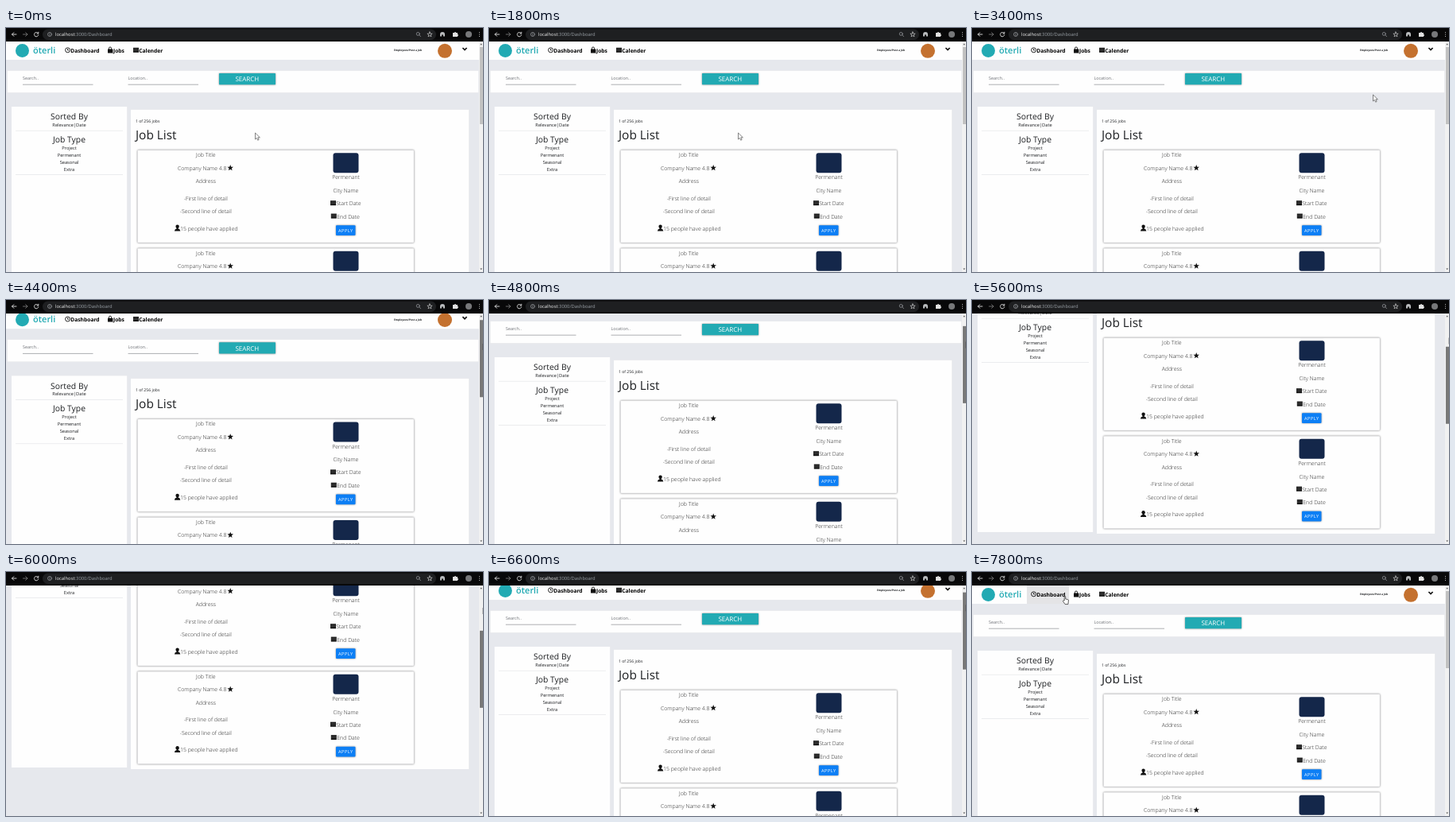
Recreate the animation shown at these times as an HTML page. Size 600x307 px, loop 8 s.

```html
<!DOCTYPE html>
<html lang="en">
<head>
<meta charset="utf-8">
<title>Job dashboard</title>
<style>
  html, body { margin: 0; width: 100%; height: 100%; overflow: hidden; background: #e6e8ed; }
  svg { display: block; width: 100%; height: 100%; }
  text { font-family: "Open Sans", "Noto Sans", sans-serif; fill: #1d1f22; text-rendering: geometricPrecision; white-space: pre; }
  .mid { text-anchor: middle; }
  .nav { font-size: 6.7px; font-weight: 700; fill: #000; }
  .hint { font-size: 5.4px; fill: #6d7075; }
  .head { font-size: 10.4px; font-weight: 500; }
  .item { font-size: 5.7px; font-weight: 500; }
  .line { font-size: 6.95px; font-weight: 300; fill: #222; }
  .white { fill: #fefefe; }
  .teal { fill: #22aab3; }
  .rule { stroke: #dfe1e4; stroke-width: .6; }
  .field { stroke: #8b8e92; stroke-width: .7; }
  .icon { fill: none; stroke: #e4e4e4; stroke-width: .9; stroke-linecap: round; stroke-linejoin: round; }
  .panel { filter: drop-shadow(0 .3px .5px #0002); }
  .raised { filter: drop-shadow(0 .7px .8px #0007); }
</style>
</head>
<body>
<svg viewBox="0 0 600 307" preserveAspectRatio="none">
  <defs>
    <g id="calendar">
      <path d="M0 .6H7V6.6H0Z" fill="#111"/>
      <path d="M.3 2.3H6.7M.3 4.2H6.7" stroke="#aaa" stroke-width=".35"/>
    </g>
    <g id="card"></g>
  </defs>

  <rect width="600" height="307" fill="#e6e8ed"/>

  <g id="page">
    <rect class="white" y="10" width="595" height="30"/>
    <rect id="hover" x="69" y="17" width="53" height="23" fill="#e4e4e6"/>
    <circle class="teal" cx="20.5" cy="28.5" r="8.5"/>
    <text x="34" y="32.2" class="teal" font-size="11" font-weight="600">öterli</text>
    <g fill="none" stroke="#111" stroke-width=".9">
      <circle cx="77.6" cy="27.8" r="3"/>
      <path d="M77.6 26V28H79"/>
      <path d="M129.4 27V25.6A1.6 1.6 0 0 1 132.6 25.6V27"/>
    </g>
    <rect x="128" y="26.6" width="6.4" height="4.8" rx=".5" fill="#111"/>
    <use href="#calendar" x="160" y="24.2"/>
    <text x="81.3" y="30.6" class="nav">Dashboard</text>
    <text x="135" y="30.6" class="nav">Jobs</text>
    <text x="167.3" y="30.6" class="nav">Calender</text>
    <text x="488" y="29.4" font-size="3.3" font-weight="700">Employees/Post a Job</text>
    <ellipse cx="552" cy="28.8" rx="9" ry="9" fill="#c4712f"/>
    <path d="M574.4 25L577 27.6L579.6 25" fill="none" stroke="#111" stroke-width="1.7"/>

    <rect class="white panel" x="1.5" y="53.5" width="593" height="28"/>
    <text x="21" y="64.8" class="hint">Search..</text>
    <text x="153.5" y="64.8" class="hint">Location..</text>
    <path class="field" d="M21 71.2H109.5M153.5 71.2H242"/>
    <rect class="teal raised" x="268" y="57" width="71" height="14.3" rx=".5"/>
    <text x="303.3" y="67.4" class="mid white" font-size="8">SEARCH</text>

    <rect class="white panel" x="7" y="99" width="145.5" height="299"/>
    <path class="rule" d="M12 129.3H147M12 184.5H147"/>
    <g id="filters"></g>

    <rect class="white panel" x="157" y="102.5" width="425.5" height="297.5"/>
    <text x="163" y="118.6" font-size="5.1">1 of 256 jobs</text>
    <text x="163" y="139.6" font-size="15.4" font-weight="500">Job List</text>
    <use href="#card"/>
    <use href="#card" y="123.5"/>
  </g>

  <rect x="595" y="17" width="5" height="290" fill="#f1f1f1"/>
  <path d="M596.3 21.3L597.7 19.6L599.1 21.3ZM596.3 302.5L597.7 304.2L599.1 302.5Z" fill="#555"/>
  <rect id="thumb" x="596" y="24" width="4" height="97"/>

  <rect width="600" height="17" fill="#080809"/>
  <rect x="46" y="1.5" width="495" height="13.5" rx="6.7" fill="#1e1f21"/>
  <g class="icon">
    <path d="M13 8H7.5M9.8 5.7L7.5 8L9.8 10.3"/>
    <path d="M21.5 8H27M24.7 5.7L27 8L24.7 10.3" stroke="#777"/>
    <path d="M40.4 6.6A2.7 2.7 0 1 0 40.8 8.8M40.8 5.2V7H39"/>
    <g stroke="#a0a3a7" stroke-width=".7">
      <circle cx="55" cy="8" r="2.5"/>
      <path d="M55 7.8V9.3M55 6.6V6.7"/>
      <circle cx="518.3" cy="7.4" r="2"/>
      <path d="M519.8 8.9L521.6 10.7"/>
    </g>
    <path id="bookmark" stroke-width=".6"/>
  </g>
  <text x="62" y="10.1" font-size="5.85" style="fill:#f1f1f1">localhost<tspan fill="#9aa0a6">:3000/Dashboard</tspan></text>
  <path d="M546 10.5V8A3 3 0 0 1 552 8V10.5H550V8.5H548V10.5Z" fill="#b9bbbd"/>
  <path d="M562 6H564A1 1 0 0 1 566 6H568V8A1 1 0 0 1 568 10V11H562Z" fill="#e2e2e2"/>
  <circle cx="582" cy="8" r="4" fill="#77787a"/>
  <path d="M595.5 5.6V5.7M595.5 8V8.1M595.5 10.4V10.5" class="icon" stroke-width="1.2"/>

  <path id="arrow" d="M0 0V8L1.9 6.4L3.2 9.2L4.6 8.5L3.4 5.8H5.9Z" fill="#fff" stroke="#333" stroke-width=".6"/>
  <path id="hand" d="M1.7 6V1A.8 .8 0 0 1 3.2 1V4L6 4.6Q7 4.8 6.9 6L6.3 10.6H2.6L.2 7.2Q-.4 6 .6 5.6Z" fill="#fff" stroke="#222" stroke-width=".7"/>
</svg>

<script>
const $ = id => document.getElementById(id);
const label = (cls, x, y, words) => `<text class="${cls}" x="${x}" y="${y}">${words}</text>`;
const centred = (cls, x, rows) => rows.map(([y, words]) => label(cls + " mid", x, y, words)).join("");

function star(cx, cy, radius) {
  const points = Array.from({ length: 10 }, (_, i) => {
    const r = i % 2 ? radius * 0.42 : radius, a = i * Math.PI / 5;
    return (cx + r * Math.sin(a)).toFixed(2) + " " + (cy - r * Math.cos(a)).toFixed(2);
  });
  return "M" + points.join("L") + "Z";
}

$("bookmark").setAttribute("d", star(533, 8.2, 3.3));

$("filters").innerHTML =
  centred("head", 79.5, [[115.4, "Sorted By"], [144.2, "Job Type"]]) +
  centred("item", 79.5, [[124.3, "Relevance|Date"], [153.1, "Project"], [162, "Permenant"],
    [170.7, "Seasonal"], [179.5, "Extra"]]);

$("card").innerHTML = `
  <rect class="white raised" x="165.5" y="153.7" width="347.5" height="116.3" rx="1" stroke="#d4d5d8" stroke-width=".4"/>
  <path d="${star(282.2, 176, 4)}" fill="#111"/>
  <circle cx="215.6" cy="249.8" r="2.2" fill="#111"/>
  <path d="M211.9 255.6Q212 253 214.6 252.4V251H216.6V252.4Q219.2 253 219.3 255.6Z" fill="#111"/>
  <rect x="411.5" y="157.3" width="32" height="25" rx="3" fill="#14274a"/>
  <use href="#calendar" x="408" y="216.6"/>
  <use href="#calendar" x="408.8" y="233"/>
  <rect class="raised" x="415" y="248.2" width="24.5" height="12.8" rx="1" fill="#0d7ff5"/>
  <text x="418" y="256.7" class="white" font-size="5.6" letter-spacing=".5">APPLY</text>` +
  centred("line", 251.3, [[162.2, "Job Title"], [195, "Address"],
    [216.6, "-First line of detail"], [233, "-Second line of detail"]]) +
  label("line", 216, 178.6, "Company Name 4.8") +
  label("line", 219, 254.6, "15 people have applied") +
  centred("line", 427.5, [[190.4, "Permenant"], [207, "City Name"]]) +
  label("line", 415.2, 223.2, "Start Date") +
  label("line", 416.3, 239.6, "End Date");

const LOOP = 8000, STEP = 200;
const SCROLL_START = 4400;
const scrolls = [3.8, 13, 27, 42, 59, 81, 106, 131, 152, 113, 48, 5];
// time, x, y of the pointer tip
const pointer = [[0, 313.5, 132], [3000, 313.5, 132], [3600, 600, 60], [6800, 600, 40],
  [7600, 122, 34], [7800, 114.5, 30]];

function pointerAt(t) {
  const i = pointer.findIndex(key => key[0] > t);
  if (i < 0) return pointer.at(-1).slice(1);
  const [t0, x0, y0] = pointer[i - 1], [t1, x1, y1] = pointer[i];
  const k = (t - t0) / (t1 - t0);
  return [x0 + (x1 - x0) * k, y0 + (y1 - y0) * k];
}

const show = (id, on) => $(id).setAttribute("visibility", on ? "visible" : "hidden");
const move = (id, x, y) => $(id).setAttribute("transform", `translate(${x} ${y})`);

function thumbColour(t) {
  if (t >= 4000 && t < 7000) return "#787878";
  return t >= 3600 && t < 4000 ? "#a8a8a8" : "#c1c1c1";
}

function draw(time) {
  const t = Math.floor(time % LOOP / STEP) * STEP;
  const scroll = scrolls[(t - SCROLL_START) / STEP] ?? 0;
  const [x, y] = pointerAt(t);
  const onLink = t >= 7600;
  move("page", 0, -scroll);
  move("thumb", 0, scroll * 0.328);
  $("thumb").setAttribute("fill", thumbColour(t));
  move("arrow", x, y);
  move("hand", x, y);
  show("arrow", !onLink);
  show("hand", onLink);
  show("hover", onLink);
}

const start = performance.now();
function tick() {
  draw(performance.now() - start);
  requestAnimationFrame(tick);
}
tick();
</script>
</body>
</html>
```
